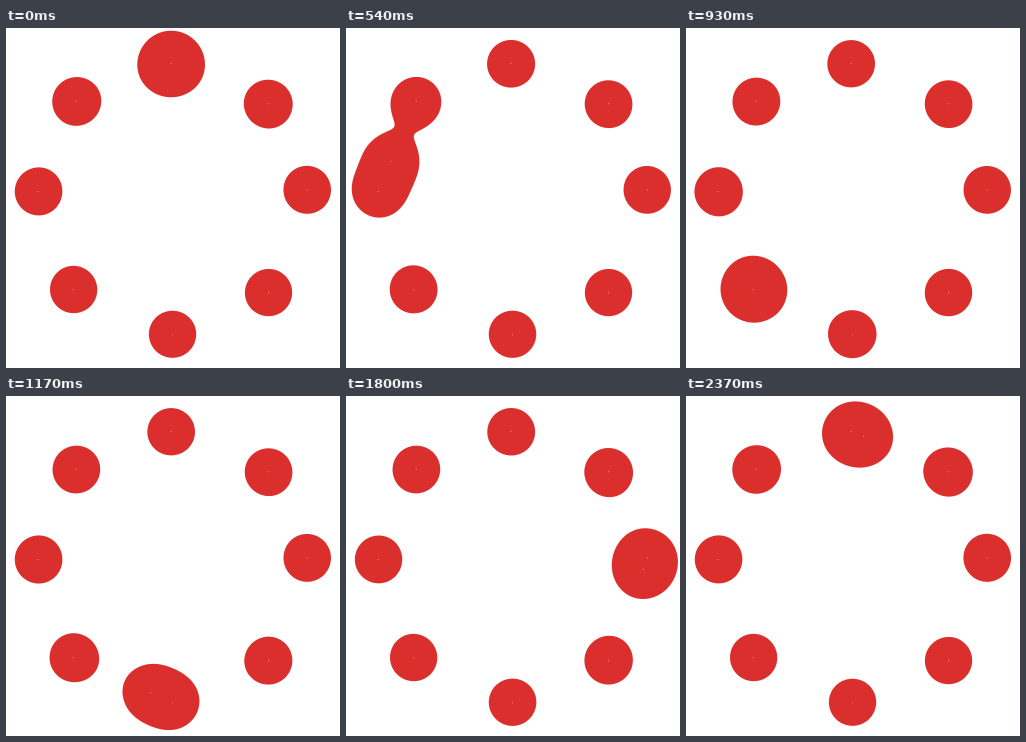
Write an HTML page with a canvas that moves like this. It is 334 px wide and 340 px high and loops after 2.4 s.

```html
<!DOCTYPE html>
<html lang="en">
<head>
<meta charset="utf-8">
<title>Metaball loader</title>
<style>
  html, body { margin: 0; width: 100%; height: 100%; overflow: hidden; background: #fff; }
  canvas { display: block; width: 334px; height: 340px; }
</style>
</head>
<body>
<canvas id="stage" width="334" height="340"></canvas>
<script>
const W = 334, H = 340;
const LOOP = 2400, TICK = 30, STEP = 300;
const STRENGTH = 478; // squared radius of a lone ball
const RED = [218, 47, 45];

// Resting balls, counterclockwise from the top
const balls = [
  [165.2, 35.4], [70.1, 73.2], [32.2, 163.5], [67.4, 261.8],
  [166.5, 306.6], [262.8, 264.8], [301.6, 162], [262.8, 75.8]
];

const ctx = document.getElementById('stage').getContext('2d');
const image = ctx.createImageData(W, H);

// The field of the resting balls and its gradient never change
const base = new Float32Array(W * H * 3);

function eachPixel(draw) {
  for (let y = 0, i = 0; y < H; y++) {
    for (let x = 0; x < W; x++, i++) draw(x + 0.5, y + 0.5, i);
  }
}

eachPixel((x, y, i) => {
  for (const [bx, by] of balls) {
    const dx = x - bx, dy = y - by;
    const d2 = dx * dx + dy * dy + 0.01;
    const f = STRENGTH / d2, g = -2 * f / d2;
    base[3 * i] += f;
    base[3 * i + 1] += g * dx;
    base[3 * i + 2] += g * dy;
  }
  for (let c = 0; c < 3; c++) image.data[4 * i + c] = RED[c];
});

const arrival = k => k === 0 ? 0 : k === 8 ? LOOP : k * STEP + TICK;

// Straight, even travel from ball to ball with a short rest at each
function runner(t) {
  let k = 0;
  while (t >= arrival(k + 1)) k++;
  const start = k ? arrival(k) + TICK : 0;
  const p = Math.max(0, (t - start) / (arrival(k + 1) - start));
  const a = balls[k], b = balls[(k + 1) % 8];
  return [a[0] + (b[0] - a[0]) * p, a[1] + (b[1] - a[1]) * p];
}

function render(t) {
  const [mx, my] = runner(t);
  eachPixel((x, y, i) => {
    const dx = x - mx, dy = y - my;
    const d2 = dx * dx + dy * dy + 0.01;
    const f = STRENGTH / d2, g = -2 * f / d2;
    const gx = base[3 * i + 1] + g * dx;
    const gy = base[3 * i + 2] + g * dy;
    const slope = Math.max(Math.sqrt(gx * gx + gy * gy), 0.004);
    const cover = (base[3 * i] + f - 1) / slope + 0.5;
    image.data[4 * i + 3] = 255 * Math.min(1, Math.max(0, cover));
  });
  ctx.putImageData(image, 0, 0);
}

let origin = null, shown = -1;

function frame(now) {
  if (origin === null) origin = now;
  const t = Math.floor(((now - origin) % LOOP) / TICK) * TICK;
  if (t !== shown) render(shown = t);
  requestAnimationFrame(frame);
}

render(0);
requestAnimationFrame(frame);
</script>
</body>
</html>
```
